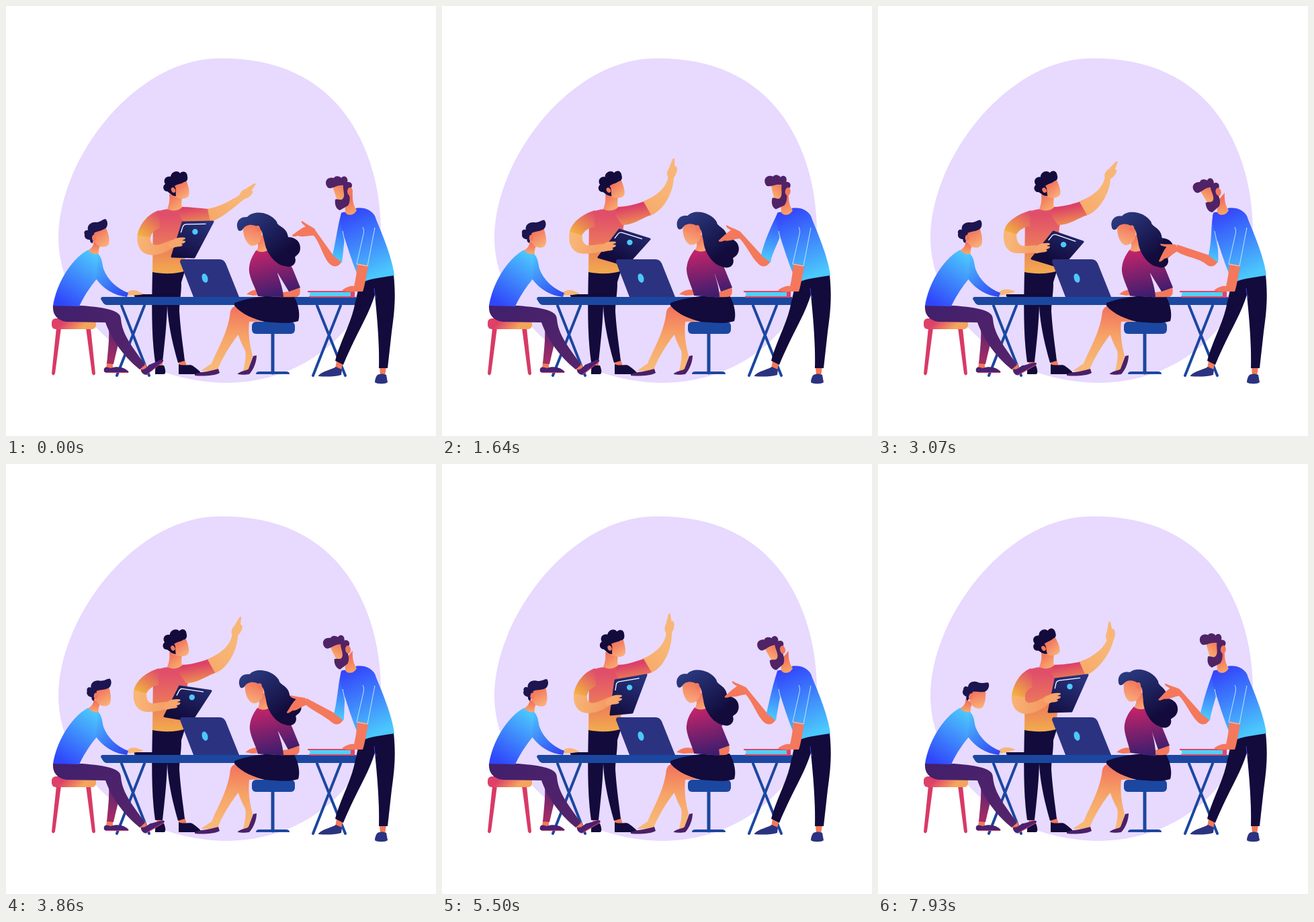
An HTML page for the animation above (8000 ms loop, 640x640 px).

```html
<!DOCTYPE html>
<html lang="en">
<head>
<meta charset="utf-8">
<title>Team meeting</title>
<style>
  html, body { margin: 0; height: 100%; overflow: hidden; background: #fff; }
  svg { display: block; width: 100vw; height: 100vh; }
</style>
</head>
<body>
<svg viewBox="0 0 640 640">
  <defs id="defs"></defs>
  <path fill="#e8d9ff" d="M318 78C400 77 465 105 508 165C545 218 558 280 558 340C558 450 470 561 325 561C180 558 78 450 78 345C78 230 190 78 318 78Z"/>

  <!-- standing man with tablet -->
  <g>
    <path fill="#f2795a" d="M224 528H233V538H225ZM256 528L266 526L269 536L259 538Z"/>
    <path fill="#120b3c" d="M218 394H260L267 392L261 411C261 430 258 440 258 455C260 485 264 510 266 528L256 531C247 500 241 470 240 446C239 480 235 510 233 530L222 530C216 490 217 440 218 394ZM223 535H235C238 542 238 548 235 548H222C222 543 222 538 223 535ZM257 533C265 537 275 531 280 537C288 543 291 546 291 548H257Z"/>
    <path id="pointArm" fill="url(#armSkin)"/>
    <path id="pointHand" fill="#f8b676" d="M-2 -4C2 -8 8 -7 12 -5L26 -2C28 -1 28 1 26 1L16 3C18 6 12 8 8 7C4 7 2 5 -2 4Z"/>
    <path fill="url(#torso2)" d="M219 311C225 304 235 303 243 302L262 299C272 300 277 312 270 328L265 395C250 399 232 399 218 396Z"/>
    <path id="pointSleeve" fill="url(#sleeveR)"/>
    <path fill="url(#neck2)" d="M243 280L262 284C261 290 261 296 262 300C255 305 246 306 240 302C243 295 244 288 243 280Z"/>
    <g id="head2">
      <path fill="url(#face2)" d="M248 267L269 261C271 268 274 276 272 282C270 287 263 287 257 286L246 282Z"/>
      <path fill="#120b3c" d="M252 283C245 282 243 277 240 276C234 276 232 268 237 265C233 259 238 252 245 254C246 246 256 244 259 249C264 244 270 247 270 254C271 258 269 262 265 262C261 265 254 265 251 268C254 272 252 275 253 283Z"/>
      <ellipse cx="249" cy="274" rx="3" ry="4" fill="#f2795a" transform="rotate(-25 249 274)"/>
    </g>
    <path id="tablet" fill="url(#tabletFill)" stroke="url(#tabletFill)" stroke-width="3" stroke-linejoin="round"/>
    <path id="tabletEdge" fill="none" stroke="#fff" stroke-width="1.3" stroke-linejoin="round"/>
    <circle id="tabletDot" r="4.2" fill="#4dc8fa"/>
    <path id="holdArm" fill="url(#armSkin2)"/>
    <path id="holdSleeve" fill="url(#sleeveL)"/>
    <path id="holdHand" fill="#f7a56c" d="M-16 5C-9 -5 -2 -7 9 -6C12 -4 8 -3 5 -2L10 -1C10 2 6 3 4 3L6 5C4 8 0 7 -4 8C-9 9 -13 11 -16 5Z"/>
  </g>

  <!-- furniture -->
  <g fill="none" stroke="#1b47a0" stroke-width="4" stroke-linecap="round">
    <path d="M206 446L165 550M172 446L213 550M498 446L457 550M463 446L505 550"/>
    <path stroke-width="5" d="M397 486V546"/>
  </g>
  <g fill="#1b47a0">
    <path d="M143 433H521V445H150C146 445 144 441 141 436Q141 434 143 433Z"/>
    <path d="M372 548Q372 544 377 544H417Q422 544 422 548Z"/>
    <rect x="366" y="470" width="64" height="18" rx="6"/>
  </g>
  <path fill="#2b3380" d="M262 377H318Q324 377 327 383L347 433H279L259 381Q259 377 262 377Z"/>
  <ellipse cx="296" cy="405" rx="4.3" ry="7" fill="#4dc8fa" transform="rotate(-16 296 405)"/>
  <path fill="#120b3c" d="M191 429H219V433H193Q190 433 191 429Z"/>
  <path fill="#e0456b" d="M449 424H519V434H451V432H513V426H449Z"/>
  <path fill="#4fd2f7" d="M451 426H513V432H451Q454 429 451 426Z"/>

  <!-- seated woman -->
  <g>
    <path fill="url(#legs)" d="M344 445C333 449 334 456 333 462C328 490 315 510 306 532L290 543L315 543C316 535 330 510 342 494C352 482 358 470 366 464Z"/>
    <path fill="url(#legs)" d="M344 447L388 469L362 470C360 490 363 505 367 521L361 543L353 543C355 535 358 522 356 513C349 500 342 482 338 460Z"/>
    <path fill="#4a2068" d="M281 548C290 544 300 545 316 540L318 546C310 551 290 551 281 550ZM345 547C352 542 358 543 361 540L368 521L373 520C373 530 368 542 362 548C357 549 350 549 345 548Z"/>
    <path fill="#120b3c" d="M340 442C355 436 370 434 385 432L428 431C436 445 438 460 435 469C420 474 400 471 385 470C370 466 352 460 340 446Z"/>
    <path id="typeArm" fill="#f4785c"/>
    <g id="lean">
      <path fill="url(#blouse)" d="M372 364C380 360 388 360 392 362C405 366 415 372 418 385C412 392 405 396 404 398C408 410 412 420 413 433L375 432C372 420 360 402 362 389C363 378 368 370 372 364Z"/>
    </g>
    <path id="blouseSleeve" fill="url(#blouse)"/>
    <g id="headW">
      <path fill="url(#neckW)" d="M372 348L386 338C385 352 388 358 392 362C386 367 378 367 373 364C376 359 376 354 372 348Z"/>
      <path fill="url(#faceW)" d="M353 328C352 345 360 356 366 357C373 357 378 352 380 346L382 326L360 320Z"/>
      <path fill="url(#hairW)" d="M346 334C341 325 345 313 359 314C368 303 393 306 403 321C404 329 418 328 420 344C430 344 438 350 438 360C438 370 430 372 430 374C434 384 424 391 415 387C403 386 388 370 385 352L381 336C376 325 358 321 352 333Q349 336 346 334Z"/>
      <path fill="#f4785c" d="M372 328C375 325 379 328 378 334C377 337 374 337 373 334Z"/>
    </g>
  </g>

  <!-- seated man on the left -->
  <g>
    <path fill="#d83a66" d="M75 479H82L73 547Q70 552 68 547ZM119 479H126L133 547Q131 552 128 547Z"/>
    <rect x="68" y="465" width="66" height="16" rx="6" fill="url(#stool)"/>
    <path fill="#f2795a" d="M150 530H159V540H149ZM199 538L207 532L211 540L202 546Z"/>
    <path fill="url(#backLeg)" d="M152 466L171 466C172 490 165 510 160 533L150 532C152 510 155 490 152 466Z"/>
    <path fill="#4a2271" d="M146 540C148 536 152 538 156 539C166 535 178 538 183 545H147Q145 544 146 540Z"/>
    <path stroke="#d83a66" d="M148 545.5H182"/>
    <path fill="url(#trousers)" d="M70 446H113C150 449 171 453 171 466C173 490 190 510 207 534L199 541C185 530 160 505 148 471L90 470C75 468 69 458 70 446Z"/>
    <g id="foot1">
      <path fill="#4a2271" d="M201 541C206 542 209 538 213 534C219 532 224 529 229 527C234 525 236 528 232 531L209 549C204 549 201 545 201 541Z"/>
      <path stroke="#d83a66" d="M209 549L233 530"/>
    </g>
    <path id="hand1" fill="#f8b676" d="M179 427C185 422 190 422 196 424L205 428C200 430 190 430 181 431Z"/>
    <path fill="url(#neck1)" d="M130 350L141 356C138 360 137 366 138 372C132 374 125 370 122 364C128 360 131 356 130 350Z"/>
    <path fill="url(#sweater)" d="M70 446C75 415 95 378 122 363C127 369 132 370 137 369C144 376 145 388 142 398C128 414 118 428 109 447Z"/>
    <path fill="url(#sweaterArm)" d="M137 370C143 376 143 384 145 391C151 408 166 421 182 427L180 433C160 431 144 420 134 406Z"/>
    <g id="head1">
      <path fill="url(#face1)" d="M130 337L148 329C152 337 155 347 153 354C150 360 142 359 137 357L130 350Z"/>
      <path fill="#1c1550" d="M117 340C115 335 119 333 122 334C120 326 127 321 135 322C142 321 144 317 148 317C152 320 152 328 148 331C142 335 135 335 131 338C132 343 130 347 129 353C126 353 125 350 125 348C120 348 116 345 117 340Z"/>
      <ellipse cx="131" cy="345" rx="3" ry="4.5" fill="#f2795a"/>
    </g>
  </g>

  <!-- bearded man on the right -->
  <g>
    <path fill="#f2795a" d="M492 528L501 532L499 543L490 540ZM556 537H566L564 551H557Z"/>
    <path fill="#2b3380" d="M465 550C472 543 485 541 491 537L500 541L499 549C490 552 475 552 465 551ZM553 549C558 547 562 547 566 549L568 560C565 563 552 563 549 560C549 555 551 551 553 549Z"/>
    <path fill="#120b3c" d="M528 407L577 400C580 430 579 450 574 485L568 539L555 539C556 500 552 460 549 430C540 460 520 490 502 534L490 528C497 500 515 470 520 440C524 425 525 415 528 407Z"/>
    <path fill="none" stroke="#3346d8" d="M548 420Q548 428 551 435"/>
    <path id="gestureArm" fill="#f4785c"/>
    <path id="gestureHand" fill="#f4785c" d="M1 -5C-6 -10 -12 -12 -18 -17C-21 -17 -19 -13 -13 -9C-20 -6 -26 -1 -33 4C-34 7 -28 6 -24 5C-18 8 -8 4 -2 5Z"/>
    <path id="gestureSleeve" fill="url(#sleeve3)"/>
    <path fill="url(#torso3)" d="M499 308C505 304 514 312 521 301C535 299 548 305 551 318C560 340 575 375 578 401C560 404 545 405 531 411C522 404 512 370 501 336C498 325 497 316 499 308Z"/>
    <path fill="#f4785c" d="M523 383L539 386C536 405 533 420 531 425H520C512 426 505 425 500 423C505 419 512 416 518 417C521 405 522 395 523 383Z"/>
    <path fill="none" stroke="#bfe4ff" d="M501 335L506 359M531 329Q534 334 531 344L522 384L538 387L549 330"/>
    <path fill="url(#neck3)" d="M504 292L516 278C515 290 518 299 522 304C518 312 508 313 505 307Z"/>
    <g id="head3">
      <path fill="url(#face3)" d="M486 269L506 264L508 290L494 292Z"/>
      <path fill="#4f2365" d="M478 269C473 262 478 253 488 256C491 251 498 254 499 256C504 250 510 256 508 262C515 261 517 267 513 272C510 272 510 275 511 280C512 288 512 292 509 297L497 304C491 302 489 295 490 288C495 286 499 291 502 286C505 280 501 273 502 267C495 266 489 270 484 271Q480 272 478 269Z"/>
      <ellipse cx="512" cy="276" rx="4" ry="6" fill="#f2795a"/>
    </g>
  </g>
</svg>

<script>
const $ = id => document.getElementById(id);
const set = (id, name, value) => $(id).setAttribute(name, value);
const draw = (id, d) => set(id, 'd', d);
const turn = (id, angle, x, y) => set(id, 'transform', `rotate(${angle} ${x} ${y})`);
const place = (id, x, y, angle = 0) => set(id, 'transform', `translate(${x} ${y}) rotate(${angle})`);

// id: x1 y1 x2 y2 followed by evenly spaced colours
const gradients = {
  armSkin: '300 315 340 280 #f7a868 #f8b676',
  torso2: '240 310 240 395 #e04e6a #ea755c #f2a94e',
  sleeveR: '285 298 290 327 #dc4068 #f0984e',
  sleeveL: '228 310 203 345 #e0506a #f2b440',
  armSkin2: '195 350 255 355 #f8b676 #f4955e',
  neck2: '243 284 258 304 #f2705a #f8b070',
  face2: '254 266 268 286 #f2705a #f9b27a',
  tabletFill: '290 315 260 378 #28327c #120b3c',
  legs: '345 450 340 535 #f2745c #f6a468 #f8b876',
  blouse: '385 360 402 430 #c8246a #3f1d6e',
  neckW: '376 345 388 366 #f2705a #f9b078',
  faceW: '372 325 362 356 #f2745c #f9ac7a',
  hairW: '355 312 405 375 #2b3a80 #120b3c',
  stool: '90 464 110 482 #de4068 #f5a45c',
  backLeg: '165 470 153 525 #4a2271 #a02c66',
  trousers: '90 447 200 540 #42206c #55246a',
  neck1: '131 353 130 371 #f2705a #f8b070',
  sweater: '82 442 130 370 #3046fb #4cc6fd',
  sweaterArm: '136 378 178 430 #4cb8fd #2f48f2',
  face1: '133 335 150 357 #f2705a #f9b27a',
  torso3: '515 305 555 400 #3346fb #4bc8fd',
  sleeve3: '500 312 492 378 #3346fb #4bc8fd',
  neck3: '508 288 515 310 #f2705a #f8a468',
  face3: '506 266 490 288 #f2705a #f9b470',
};
$('defs').innerHTML = Object.entries(gradients).map(([id, spec]) => {
  const [x1, y1, x2, y2, ...colors] = spec.split(' ');
  const stops = colors.map((c, i) => `<stop offset="${i / (colors.length - 1)}" stop-color="${c}"/>`).join('');
  return `<linearGradient id="${id}" gradientUnits="userSpaceOnUse" x1="${x1}" y1="${y1}" x2="${x2}" y2="${y2}">${stops}</linearGradient>`;
}).join('');

const LOOP = 8000;
const times = [0, 1640, 3070, 4640, 5500, 6570, 7930];
const tracks = {
  head1: [0, 5, 5, 11, 10, 20, 21],
  hand1: [2, 0, -8, 0, 0, 0, -8],
  foot1: [0, 0, 9, 8, 8, 1, 9],
  head2: [0, -4, -5, 1, 2, 0, -9],
  hold: [.69, .19, 0, .44, .75, 1, 1],
  raise: [0, .9, .88, .95, 1, 1, .6],
  pointX: [352, 341, 342, 340, 338, 336, 346],
  pointY: [284, 254, 255, 252, 250, 249, 262],
  pointAngle: [-45, -81, -59, -84, -88, -94, -92],
  lean: [0, 3, 1.5, 1.2, 2.8, 6, 6.5],
  nod: [0, 0, 1, .5, 0, 0, 2],
  elbowW: [438, 432, 439, 435, 428, 427, 434],
  handW: [358, 353, 359, 354, 349, 348, 355],
  head3: [0, 6, -12, -1, -11, -2, 4],
  elbow3: [492, 481, 498, 491, 489, 493, 486],
  wristX: [459, 444, 445, 449, 453, 447, 449],
  wristY: [337, 341, 360, 347, 338, 350, 340],
  palm: [0, -7, -29, -15, -7, -20, -11],
};
// tablet corners, clockwise from top left
const tabletPoses = [
  [263, 322, 308, 321, 280, 374, 247, 373],
  [264, 333, 309, 347, 274, 386, 233, 374],
  [261, 336, 305, 351, 272, 389, 229, 376],
  [256, 326, 305, 325, 280, 376, 243, 375],
  [258, 322, 304, 314, 283, 370, 251, 373],
  [260, 319, 307, 308, 288, 365, 257, 370],
  [264, 320, 312, 314, 288, 368, 254, 369],
];

const mix = (a, b, k) => a + (b - a) * k;

function blendPath(from, to, k) {
  const ends = to.match(/[\d.]+/g);
  let i = 0;
  return from.replace(/[\d.]+/g, n => mix(+n, +ends[i++], k));
}

function drawTablet(c) {
  const at = (u, v) => [0, 1].map(i => mix(mix(c[i], c[i + 2], u), mix(c[i + 6], c[i + 4], u), v));
  draw('tablet', `M${c.slice(0, 2)}L${c.slice(2)}Z`);
  draw('tabletEdge', `M${at(.05, .3)}L${at(.05, .12)}Q${at(.06, .06)} ${at(.14, .06)}L${at(.8, .06)}`);
  const [x, y] = at(.55, .28);
  place('tabletDot', x, y);
}

function drawPointingArm({ raise: q, pointX: x, pointY: y, pointAngle }) {
  const top = 302 - 12 * q, lowX = 304 + 8 * q, lowY = 321 - 11 * q;
  const dx = 14 - 14 * q, dy = 9 + 13 * q;
  draw('pointArm', `M298 ${top}C316 ${top - 2 - 5 * q} ${x - 4 - dx} ${y - 3 + dy} ${x - 4} ${y - 3}
    L${x + 4} ${y + 2}C${x + 4 - dx} ${y + 2 + dy * 1.3} ${lowX + 14} ${lowY - 2} ${lowX - 3} ${lowY + 1}Z`);
  draw('pointSleeve', `M260 299C275 299 288 ${top - 1 + 5 * q} 300 ${top}L${lowX} ${lowY}C295 ${lowY + 6} 285 326 268 326L258 312Z`);
  place('pointHand', x, y, pointAngle);
}

function drawHoldingArm(p) {
  draw('holdArm', blendPath(
    'M188 333C184 352 191 368 208 368C220 368 230 368 240 366L236 356C225 357 219 357 216 357C209 356 206 350 206 339Z',
    'M199 344C198 362 207 372 222 372C234 371 246 364 257 355L252 344C244 349 236 354 229 355C221 357 218 352 219 346Z', p));
  draw('holdSleeve', blendPath(
    'M228 304C210 309 191 320 188 334L206 340C210 334 216 329 226 328Z',
    'M228 304C212 309 201 328 199 345L219 347C219 340 222 336 230 332Z', p));
  place('holdHand', 246 + 16 * p, 359 - 12 * p);
}

function drawWoman({ lean, nod, elbowW: e, handW: h }) {
  turn('lean', lean, 395, 435);
  set('headW', 'transform', `rotate(${lean} 395 435) rotate(${nod} 383 360)`);
  draw('blouseSleeve', `M${396 + lean} 364C412 370 ${e - 16} 380 ${e - 11} 392L${e} 419L${e - 17} 425L${404 + lean / 2} 397Z`);
  draw('typeArm', `M${e - 18} 425L${e - 1} 417C${e + 1} 428 ${e - 1} 433 ${e - 7} 433C405 434 390 432 380 430L${h + 10} 431L${h} 429
    C${h + 8} 421 ${h + 20} 421 ${h + 28} 424C400 427 410 427 ${e - 18} 425Z`);
}

function drawGesture({ elbow3: e, wristX: x, wristY: y, palm }) {
  draw('gestureArm', `M${x} ${y - 5}L${e - 5} 371L${e + 8} 379C${e + 5} 388 ${e - 4} 390 ${e - 10} 384C${e - 20} 375 ${x + 8} ${y + 13} ${x - 2} ${y + 4}Z`);
  draw('gestureSleeve', `M500 307C495 318 ${e} 345 ${e - 6} 371L${e + 8} 382C${e + 10} 366 503 350 506 332Z`);
  place('gestureHand', x, y, palm);
}

function render(t) {
  const last = times.length - 2;
  let i = 0;
  while (i < last && t >= times[i + 1]) i++;
  const u = Math.min(1, (t - times[i]) / (times[i + 1] - times[i]));
  const k = u * u * (3 - 2 * u);
  const pose = {};
  for (const name in tracks) pose[name] = mix(tracks[name][i], tracks[name][i + 1], k);

  turn('head1', pose.head1, 133, 365);
  turn('hand1', pose.hand1, 182, 429);
  turn('foot1', pose.foot1, 205, 542);
  turn('head2', pose.head2, 250, 290);
  turn('head3', pose.head3, 512, 302);
  drawTablet(tabletPoses[i].map((n, j) => mix(n, tabletPoses[i + 1][j], k)));
  drawPointingArm(pose);
  drawHoldingArm(pose.hold);
  drawWoman(pose);
  drawGesture(pose);
}

const start = performance.now();
function tick() {
  render((performance.now() - start) % LOOP);
  requestAnimationFrame(tick);
}
tick();
</script>
</body>
</html>
```
